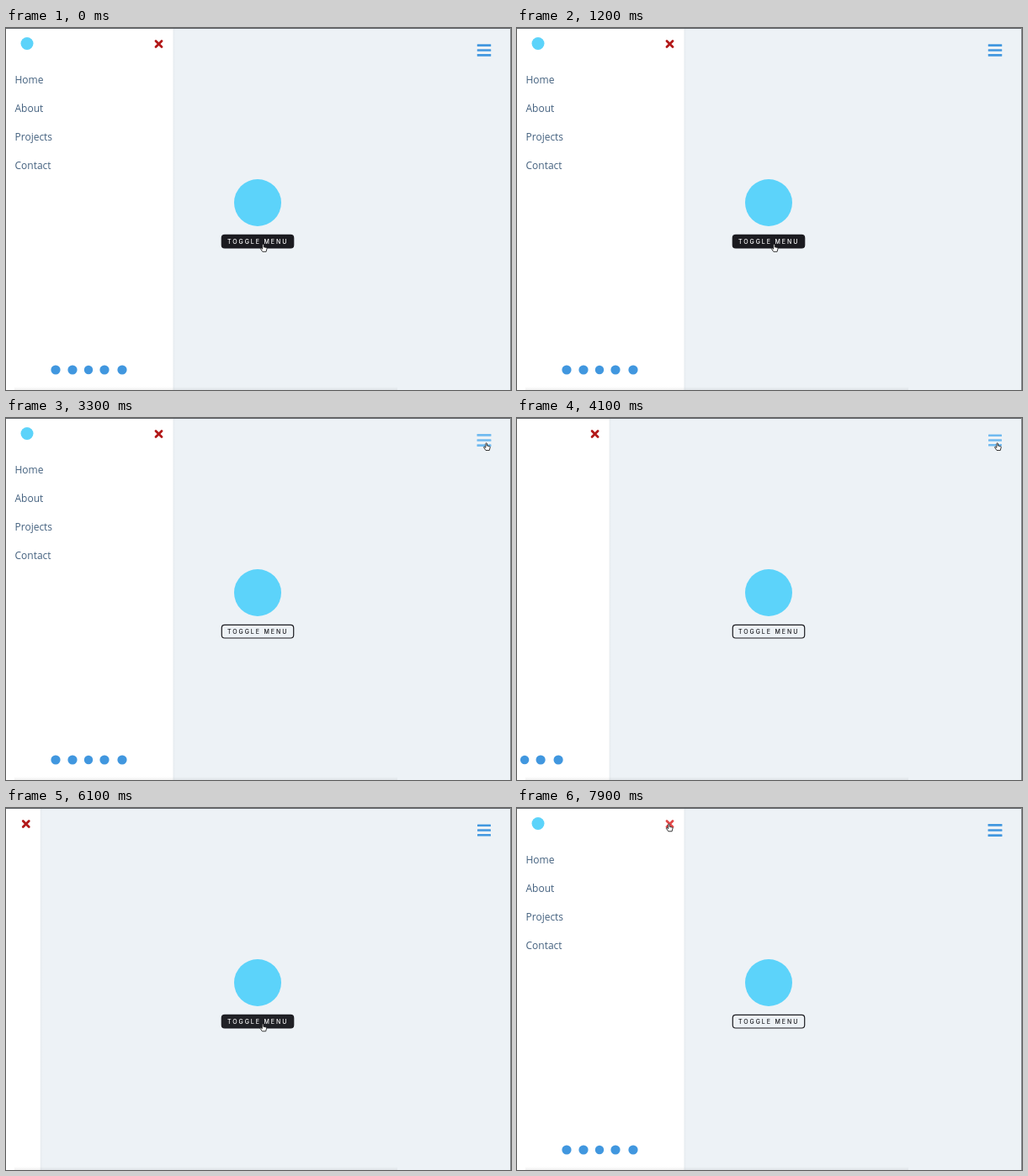
An HTML page for the animation above (8 s loop, 600 px wide and 431 px high).

```html
<!DOCTYPE html>
<html lang="en">
<head>
<meta charset="utf-8">
<title>Sidebar menu</title>
<style>
  html, body { margin: 0; width: 100%; height: 100%; overflow: hidden; background: #edf2f6; }
  svg { display: block; width: 600px; height: 431px; }
  .nav { font: 12px "Open Sans", sans-serif; fill: #44617f; }
  .label { font: 500 7px Inter, sans-serif; letter-spacing: 1.9px; }
</style>
</head>
<body>
<svg viewBox="0 0 600 431">
  <defs>
    <linearGradient id="edge">
      <stop offset="0" stop-color="#000" stop-opacity=".03"/>
      <stop offset="1" stop-color="#000" stop-opacity="0"/>
    </linearGradient>
    <linearGradient id="floor" x2="0" y2="1">
      <stop offset="0" stop-color="#000" stop-opacity="0"/>
      <stop offset="1" stop-color="#000" stop-opacity=".06"/>
    </linearGradient>
  </defs>
  <rect width="600" height="431" fill="#edf2f6"/>
  <circle cx="299" cy="208" r="28" fill="#5cd3fa"/>
  <g id="button">
    <rect x="256.3" y="246.4" width="85.4" height="15.6" rx="3.5" stroke="#1b1b20" stroke-width="1.2"/>
    <text class="label" x="263" y="256.8">TOGGLE MENU</text>
  </g>
  <g id="burger">
    <rect x="-8" y="-7" width="16" height="2.57" rx=".5"/>
    <rect x="-8" y="-1.28" width="16" height="2.57" rx=".5"/>
    <rect x="-8" y="4.43" width="16" height="2.57" rx=".5"/>
  </g>
  <g id="menu">
    <rect width="198.5" height="431" fill="#fff"/>
    <rect x="198.5" width="3" height="431" fill="url(#edge)"/>
    <circle cx="25" cy="18.5" r="7.5" fill="#5cd3fa"/>
    <path id="close" d="M178 15.4l7 7m0-7l-7 7" stroke-width="2.8" stroke-linecap="round"/>
    <g class="nav">
      <text x="10.5" y="66">Home</text>
      <text x="10.5" y="100">About</text>
      <text x="10.5" y="134">Projects</text>
      <text x="10.5" y="168">Contact</text>
    </g>
    <g fill="#4197df">
      <circle cx="59" cy="407" r="5.6"/>
      <circle cx="79" cy="407" r="5.6"/>
      <circle cx="98" cy="407" r="5.2"/>
      <circle cx="117" cy="407" r="5.6"/>
      <circle cx="138" cy="407" r="5.6"/>
    </g>
  </g>
  <rect x="10" y="427" width="455" height="4" fill="url(#floor)"/>
  <path d="M0 .5H600" stroke="#62666b"/>
  <path d="M599.5 0V431" stroke="#85898d"/>
  <path id="arrow" d="M0 0V7.6L1.7 6.1L2.9 8.7L4.2 8.1L3.1 5.6H5.4Z" fill="#000" stroke="#fff" stroke-width=".5"/>
  <path id="hand" d="M-.8 .6Q0-.4 .8 .6V3.3L4 4Q4.6 4.3 4.5 5.2L3.6 8.8H-.7L-3.2 5.2Q-3 4.2-2 4.7L-.8 5.7Z"
        fill="#fff" stroke="#222" stroke-width=".9" stroke-linejoin="round"/>
</svg>
<script>
const LOOP = 8000, SLIDE = 400, PULSE = 2000;
const $ = id => document.getElementById(id);
const [button, burger, menu, close, arrow, hand] =
  ["button", "burger", "menu", "close", "arrow", "hand"].map($);
const [box, label] = button.children;

// The menu starts open; each time toggles it.
const toggles = [40, 700, 1640, 2640, 3917, 5980];

// [enter, leave] times of the pointer
const hovers = {
  button: [[-1000, 2135], [5780, 6160]],
  burger: [[2470, 4340]],
  close: [[7700, 9000]]
};

// [time, x, y] of the pointer tip
const path = [
  [0, 305.5, 257.5], [2120, 305.5, 257.5], [2300, 493.5, 97.5], [2500, 570.7, 29.7], [4300, 570.7, 29.7],
  [4600, 420, 180], [4850, 220, 320], [5100, 53, 280], [5350, 190, 290],
  [5600, 307.7, 264.7], [5800, 306, 257], [6130, 305, 257], [6600, 47.7, 25.3],
  [6850, 66, 110], [7100, 29, 213], [7350, 85, 125], [7600, 168, 6],
  [7750, 180.5, 19], [LOOP, 180.5, 19]
];

const clamp = v => Math.min(1, Math.max(0, v));
const smooth = v => v * v * (3 - 2 * v);
const mix = (a, b, k) => a + (b - a) * k;
const blend = (a, b, k) => `rgb(${a.map((v, i) => mix(v, b[i], k))})`;

const isOver = (name, t) => hovers[name].some(([a, b]) => t >= a && t < b);
const hoverLevel = (name, t, fade) => Math.max(...hovers[name].map(
  ([a, b]) => Math.min(clamp((t - a) / fade), 1 - clamp((t - b) / fade))));

function openness(t) {
  return toggles.reduce((open, start, i) =>
    open + (i % 2 ? 1 : -1) * smooth(clamp((t - start) / SLIDE)), 1);
}

function pointer(t) {
  const i = path.findIndex(p => p[0] > t);
  const [t0, x0, y0] = path[i - 1], [t1, x1, y1] = path[i];
  const k = (t - t0) / (t1 - t0);
  return [mix(x0, x1, k), mix(y0, y1, k)];
}

function draw(t) {
  const open = openness(t);
  menu.setAttribute("transform", `translate(${-202 * (1 - open)})`);
  menu.style.visibility = open > 0.001 ? "visible" : "hidden";

  const lit = hoverLevel("button", t, 330);
  box.setAttribute("fill", `rgba(27,27,32,${lit})`);
  label.setAttribute("fill", blend([27, 27, 32], [255, 255, 255], lit));

  const scale = 1 + 0.1 * Math.cos(2 * Math.PI * (t - 1600) / PULSE);
  burger.setAttribute("transform", `translate(568 26.5) scale(${scale})`);
  burger.setAttribute("fill", blend([65, 151, 223], [112, 186, 240], hoverLevel("burger", t, 200)));
  close.setAttribute("stroke", blend([178, 24, 24], [226, 72, 72], hoverLevel("close", t, 200)));

  const pointing = Object.keys(hovers).some(name => isOver(name, t));
  const place = `translate(${pointer(t)})`;
  arrow.setAttribute("transform", place);
  hand.setAttribute("transform", place);
  arrow.style.display = pointing ? "none" : "";
  hand.style.display = pointing ? "" : "none";
}

const begin = performance.now();
function tick() {
  draw((performance.now() - begin) % LOOP);
  requestAnimationFrame(tick);
}
tick();
</script>
</body>
</html>
```
